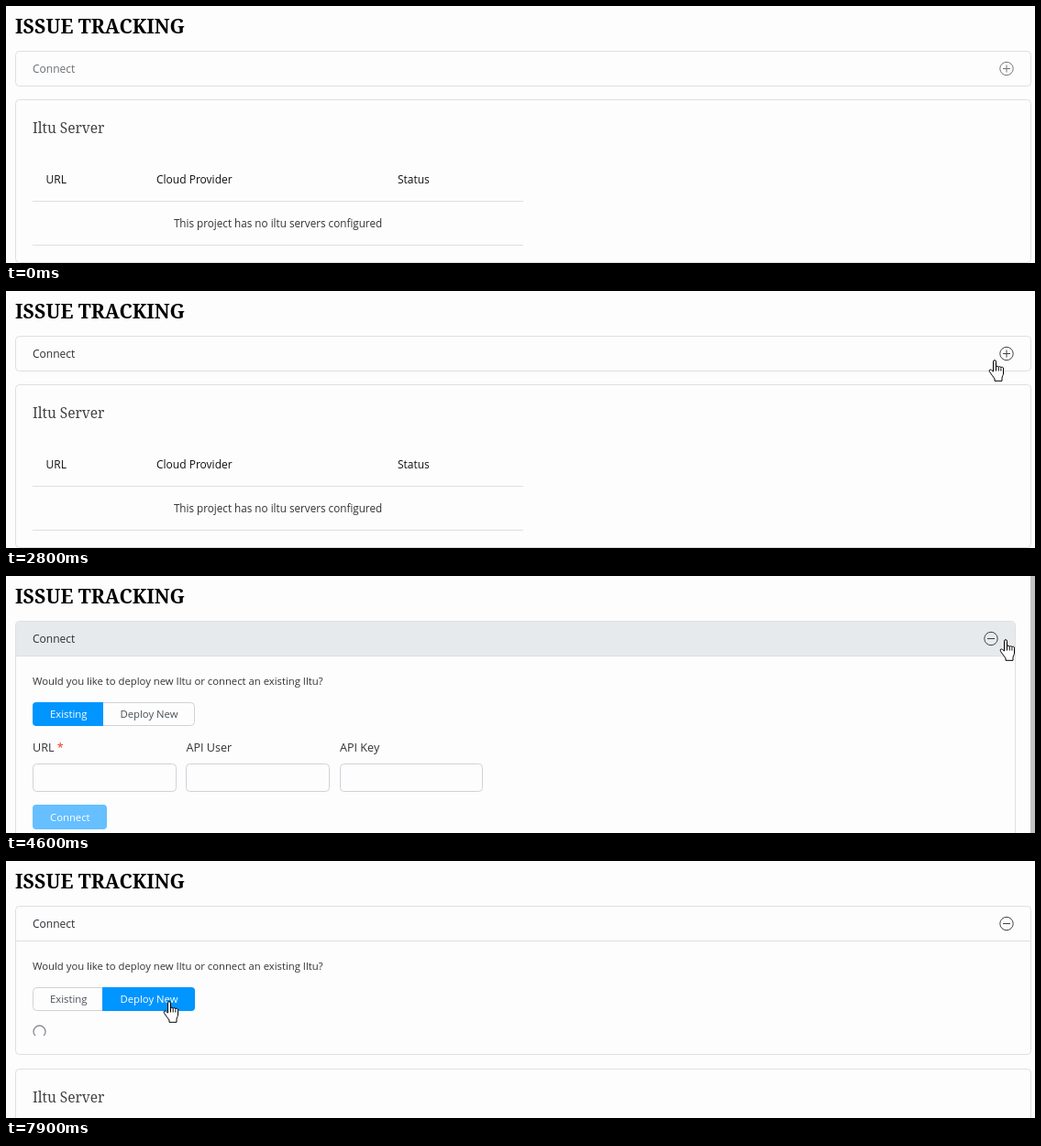
Write an HTML page that moves like this. It is 1122 by 281 pixels and loops after 8000 ms.

```html
<!DOCTYPE html>
<html lang="en">
<head>
<meta charset="utf-8">
<title>Issue tracking</title>
<style>
  html, body { margin: 0; width: 100%; height: 100%; overflow: hidden; background: #fdfdfd; }
  svg { display: block; width: 1122px; height: 281px; font: 12px "Open Sans", "Noto Sans", sans-serif; fill: #333; }
  .slab { font-family: "Noto Serif", serif; }
  .title { font-size: 21.3px; font-weight: 700; fill: #000; }
  .heading { font-size: 15.5px; fill: #444; }
  .head { font-weight: 500; fill: #111; }
  .small { font-size: 11.3px; }
  .label { font-size: 12.6px; font-weight: 500; }
  .box { fill: #fdfdfd; stroke: #dedfe0; }
  .field { fill: #fdfdfd; stroke: #cfd2d9; }
  .rule { stroke: #dedfe0; fill: none; }
  .cursor { fill: #fff; stroke: #000; stroke-linejoin: round; }
  #beam { fill: none; stroke: #fff; mix-blend-mode: difference; }
</style>
</head>
<body>
<svg viewBox="0 0 1122 281">
  <defs>
    <clipPath id="selected"><rect id="selectedArea" x="10" y="7" height="29"/></clipPath>
    <clipPath id="inCard"><rect id="cardArea" x="10" y="49" width="1108"/></clipPath>
  </defs>
  <rect width="1122" height="281" fill="#fdfdfd"/>

  <text id="title" class="slab title" x="10" y="30">ISSUE TRACKING</text>
  <g clip-path="url(#selected)">
    <rect x="10" y="7" width="240" height="29" fill="#3268d2"/>
    <text class="slab title" x="10" y="30" style="fill:#fff">ISSUE TRACKING</text>
  </g>

  <g id="servers">
    <rect id="serverCard" class="box" x="10.5" y="102.5" height="178" rx="4"/>
    <text class="slab heading" x="29" y="139">Iltu Server</text>
    <g class="head">
      <text x="43.5" y="194">URL</text>
      <text x="164" y="194">Cloud Provider</text>
      <text x="427" y="194">Status</text>
    </g>
    <path class="rule" d="M29 213.5H564M29 261.5H564"/>
    <text x="296.5" y="242" text-anchor="middle" font-size="11.7">This project has no iltu servers configured</text>
  </g>

  <rect id="card" class="box" x="10.5" y="49.5" rx="4"/>
  <path id="hover" fill="#e7eaed"/>
  <path id="divider" class="rule"/>
  <text id="connect" x="29" y="73">Connect</text>
  <g id="icon" fill="none">
    <circle r="7.2"/>
    <path d="M-4 0H4"/>
    <path id="plus" d="M0-4V4"/>
  </g>

  <g id="body" clip-path="url(#inCard)">
    <text class="small" x="29" y="119">Would you like to deploy new Iltu or connect an existing Iltu?</text>
    <rect class="field" x="29.5" y="138.5" width="176" height="25" rx="4"/>
    <path id="active" fill="#0095ff"/>
    <text id="existing" class="small" x="48" y="155">Existing</text>
    <text id="deploy" class="small" x="124.5" y="155">Deploy New</text>
    <g id="form">
      <g class="label">
        <text x="29" y="192">URL <tspan fill="#f5341d">*</tspan></text>
        <text x="196.5" y="192">API User</text>
        <text x="364" y="192">API Key</text>
      </g>
      <rect class="field" x="29.5" y="205.5" width="156" height="30" rx="4"/>
      <rect class="field" x="196.5" y="205.5" width="156" height="30" rx="4"/>
      <rect class="field" x="364.5" y="205.5" width="155" height="30" rx="4"/>
      <rect x="29" y="250" width="81" height="27" rx="4" fill="#66bfff"/>
      <text class="small" x="48" y="268" style="fill:#fff">Connect</text>
    </g>
    <path id="spinner" d="M-4.6 4.6A6.5 6.5 0 1 1 4.6 4.6" fill="none" stroke="#8b8f93" stroke-width="1.4"/>
  </g>

  <rect id="scrollbar" x="1117" width="5" height="281" fill="#c1c1c1"/>

  <path id="beam" d="M-3-8h2l1 1 1-1h2M0-7V7M-3 8h2l1-1 1 1h2"/>
  <path id="arrow" class="cursor" d="M.5.5V16.5L4.3 13 7 18.5 9.5 17.5 7 12H12z"/>
  <path id="hand" class="cursor" d="M5.5 13V2.2a1.5 1.5 0 0 1 3 0V8a1.4 1.4 0 0 1 2.7.5a1.4 1.4 0 0 1 2.7.6a1.3 1.3 0 0 1 2.6 1V15c0 2-1.5 3.5-1.5 5.2V23.3H7V21C5.5 18.5 3 16 1.5 13.4C.4 11.4 2 10.3 3.4 11.3zM8.5 8V12.5M11.2 8.5V12.5M13.9 9.5V12.5"/>
</svg>
<script>
const LOOP = 8000, STEP = 100;
const $ = id => document.getElementById(id);
const title = $('title');

// time, x, y and, where the shape changes, the cursor
const path = [
  [300, 112, 14, 'beam'], [800, 15, 19], [1000, 15, 19], [1400, 184, 22], [1500, 196, 25],
  [1600, 195, 26, 'arrow'], [1700, 195, 26], [1900, 201, 26], [2100, 201, 26],
  [2300, 211, 23], [2400, 211, 23], [2500, 1073, 120], [2600, 1073, 120],
  [2700, 1069, 78, 'hand'], [2800, 1071, 75], [2900, 1074, 74], [3000, 1074, 74],
  [3100, 1089, 75], [3300, 1086, 70], [3400, 1086, 70], [3700, 1078, 72], [3900, 1084, 69],
  [4000, 1084, 69], [4100, 1083, 69], [4800, 1083, 69], [5100, 960, 63],
  [5200, 850, 106, 'arrow'], [5300, 850, 106], [5700, 260, 122], [6000, 180, 134], [6100, 177, 143],
  [6200, 169, 152, 'hand'], [6300, 169, 152], [6400, 171, 152], [6700, 171, 152], [6800, 171, 153]
];

function cursorAt(t) {
  if (t < path[0][0]) return { x: 0, y: 0, shape: 'none' };
  let i = 0, shape = path[0][3];
  while (path[i + 1] && path[i + 1][0] <= t) shape = path[++i][3] || shape;
  const a = path[i], b = path[i + 1] || a;
  const k = b === a ? 0 : (t - a[0]) / (b[0] - a[0]);
  return { x: a[1] + (b[1] - a[1]) * k, y: a[2] + (b[2] - a[2]) * k, shape };
}

function set(id, attrs) {
  for (const name in attrs) $(id).setAttribute(name, attrs[name]);
}

const show = (id, on) => set(id, { visibility: on ? 'inherit' : 'hidden' });
const move = (id, x, y, extra = '') => set(id, { transform: `translate(${x} ${y}) ${extra}` });

function selectionWidth(t, x) {
  if (t < 1100 || t >= 2500) return 0;
  const count = title.getNumberOfChars();
  let end = 10;
  for (let i = 0; i < count; i++) {
    const from = title.getStartPositionOfChar(i).x, to = title.getEndPositionOfChar(i).x;
    if (t >= 1600 || x > (from + to) / 2) end = to;
  }
  return end - 10;
}

function draw(t) {
  const cursor = cursorAt(t);
  for (const shape of ['beam', 'arrow', 'hand']) show(shape, shape === cursor.shape);
  if (cursor.shape !== 'none') move(cursor.shape, Math.round(cursor.x), Math.round(cursor.y));
  set('selectedArea', { width: selectionWidth(t, cursor.x) });

  const open = t >= 4400, deploying = t >= 7000, scrolled = open && !deploying;
  const grow = Math.min(1, (t - 4300) / 300);
  const extra = deploying ? 124 : open ? 209 * grow : 0;
  const right = scrolled ? 1100.5 : 1117.5;

  set('card', { width: right - 10.5, height: 38 + extra });
  set('cardArea', { height: 38 + extra });
  set('serverCard', { width: right - 10.5 });
  move('servers', 0, open ? extra + 1 : 0);
  show('scrollbar', scrolled);

  const corner = open ? `V87H11` : `V83a4 4 0 0 1-4 4H15a4 4 0 0 1-4-4`;
  set('hover', { d: `M11 54a4 4 0 0 1 4-4H${right - 4.5}a4 4 0 0 1 4 4${corner}z` });
  show('hover', t >= 2900 && t < 5400);
  set('divider', { d: `M10.5 87.5H${right}` });
  show('divider', open);

  const hovered = t >= 2700;
  set('connect', { fill: hovered ? '#2b2f33' : '#6a7075' });
  set('icon', { stroke: hovered ? '#3c4043' : '#70757a' });
  move('icon', right - 26.5, 68.5);
  show('plus', !open);

  show('body', open);
  show('form', !deploying);
  show('spinner', deploying);
  set('active', { d: deploying
    ? 'M105 138h97a4 4 0 0 1 4 4v18a4 4 0 0 1-4 4h-97z'
    : 'M106 138H33a4 4 0 0 0-4 4v18a4 4 0 0 0 4 4h73z' });
  set('existing', { fill: deploying ? '#495057' : '#fff' });
  set('deploy', { fill: deploying ? '#fff' : '#495057' });
  move('spinner', 36.5, 186.5, `rotate(${(t - 7900) * 0.36})`);
}

function frame() {
  const t = performance.now() % LOOP;
  draw(Math.floor(t / STEP) * STEP);
  requestAnimationFrame(frame);
}
frame();
</script>
</body>
</html>
```
